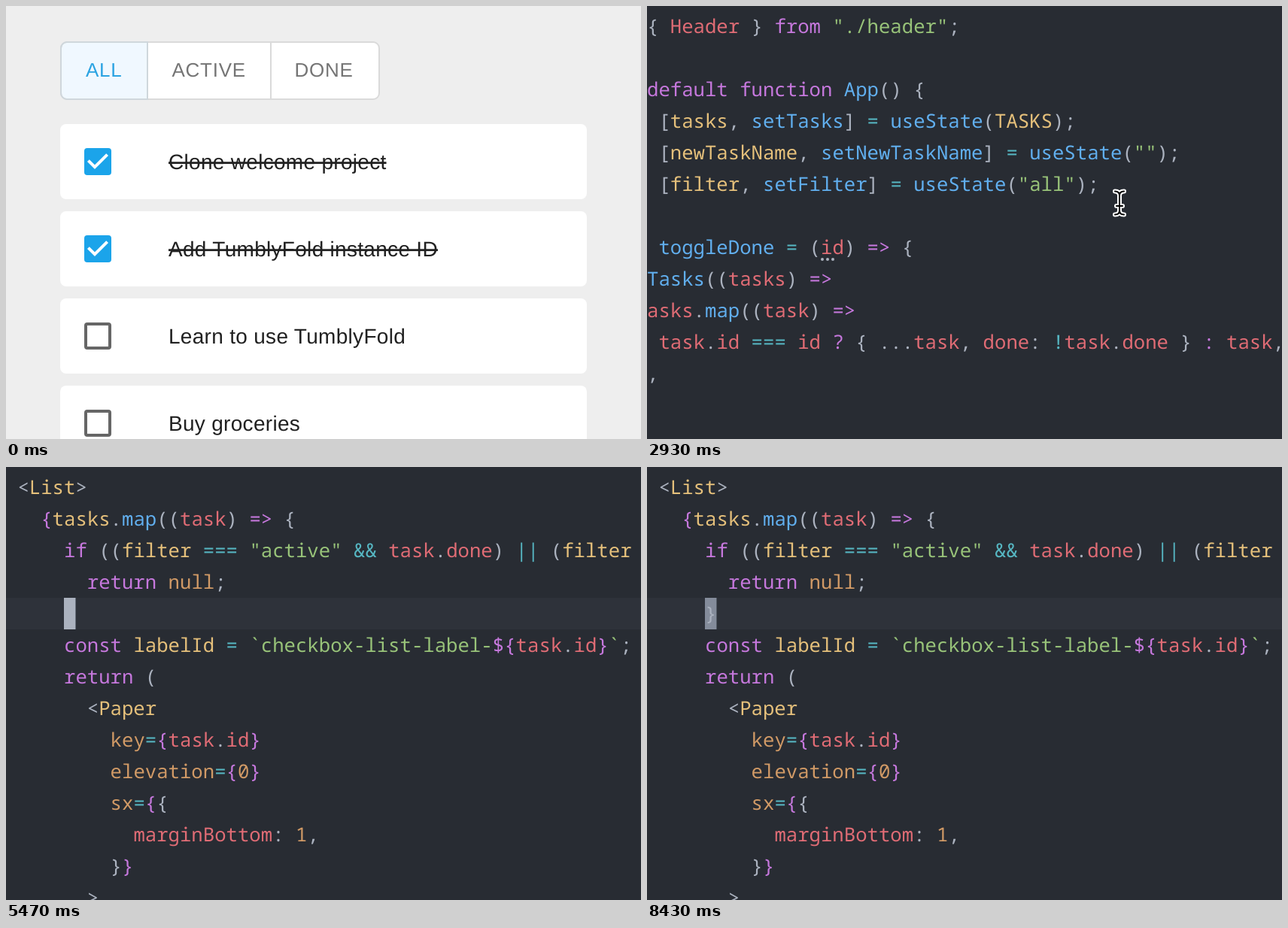
An HTML page for the animation above (8.47 s loop, 844 px wide and 576 px high).

```html
<!DOCTYPE html>
<html lang="en">
<head>
<meta charset="utf-8">
<title>Open in editor</title>
<style>
  html, body { margin: 0; width: 100%; height: 100%; overflow: hidden; background: #eee; }
  svg { display: block; width: 844px; height: 576px; }
  text { white-space: pre; text-rendering: geometricPrecision; }
  .tab { font: 26px "Liberation Sans", Arial, sans-serif; letter-spacing: .02857em; fill: #757575; }
  .tab.on { fill: #2ba3e2; }
  .task { font: 28px "Liberation Sans", Arial, sans-serif; letter-spacing: .01071em; fill: #212121; }
  .done { text-decoration: line-through; }
  .item { font: 500 22px Inter, sans-serif; fill: #333; }
  .code { font: 500 25.667px "Noto Sans Mono", monospace; }
  .outline { fill: none; stroke: #3580de; }
  #menu { filter: drop-shadow(0 8px 10px rgba(0, 0, 0, .16)); }
  #pointer { filter: drop-shadow(0 2px 2px rgba(0, 0, 0, .3)); }
</style>
</head>
<body>
<svg id="stage" viewBox="0 0 844 576">
  <g id="page">
    <rect width="844" height="576" fill="#eee"/>
    <rect x="73" y="48" width="423" height="76" rx="8" fill="#fff"/>
    <path d="M188 48H81a8 8 0 0 0-8 8v60a8 8 0 0 0 8 8H188z" fill="#f0f8ff"/>
    <rect x="73" y="48" width="423" height="76" rx="8" fill="none" stroke="#dadada" stroke-width="2"/>
    <path d="M352 48v76" stroke="#dadada" stroke-width="2"/>
    <path d="M188 48H81a8 8 0 0 0-8 8v60a8 8 0 0 0 8 8H188z" fill="none" stroke="#cfd7dc" stroke-width="2"/>
    <text class="tab on" x="106" y="94">ALL</text>
    <text class="tab" x="220.5" y="94">ACTIVE</text>
    <text class="tab" x="383.5" y="94">DONE</text>
    <g id="tasks"></g>
    <g id="cardLines"></g>
    <g id="textLines"></g>
    <g id="menu">
      <rect x="601" y="181" width="210" height="216" rx="5" fill="#eee" stroke="#c9c9c9" stroke-width="2"/>
      <rect id="hover" x="602" width="208" height="42" fill="#d0d0d0"/>
      <path d="M602 269H810" stroke="#cbcbcb" stroke-width="2"/>
      <text class="item" x="618" y="211">View In Source</text>
      <text class="item" x="618" y="253">Open In Editor</text>
      <text class="item" x="618" y="299">Copy</text>
      <text class="item" x="618" y="341">Duplicate</text>
      <text class="item" x="618" y="383">Delete</text>
      <path d="M778 249L789 238M780 238H789V247" fill="none" stroke="#333" stroke-width="2"/>
    </g>
    <path id="pointer" d="M0 0V28.5L6.4 22.6 11 33.5 16 31.4 11.4 20.8H20.5Z" stroke="#fff" stroke-width="2.2"/>
  </g>
  <g id="editor">
    <rect width="844" height="576" fill="#282c33"/>
    <g id="top">
      <g fill="#abb2bf"><circle cx="233" cy="337" r="2"/><circle cx="240" cy="337" r="2"/><circle cx="247" cy="337" r="2"/></g>
    </g>
    <g id="list">
      <rect id="row" width="844" height="42" fill="#2e323a"/>
      <rect id="match" width="15.4" height="42" fill="#515a6b"/>
      <rect id="caret" height="42" fill="#abb2bf"/>
      <g id="head"></g>
      <g id="added"></g>
      <g id="tail"></g>
    </g>
    <g id="beam" fill="none" stroke-linecap="round">
      <path id="beamShape" d="M-6-15.5Q0-15.5 0-10V10Q0 15.5-6 15.5M6-15.5Q0-15.5 0-10M6 15.5Q0 15.5 0 10M-4 4H4" stroke="#fff" stroke-width="6"/>
      <use href="#beamShape"/>
    </g>
  </g>
</svg>
<script>
const LOOP = 8470, CELL = 15.4, LINE = 42;
const $ = id => document.getElementById(id);

function add(parent, tag, attrs, text) {
  const el = document.createElementNS("http://www.w3.org/2000/svg", tag);
  for (const k in attrs) el.setAttribute(k, attrs[k]);
  if (text) el.textContent = text;
  parent.appendChild(el);
  return el;
}

// ---- task page ----
["Clone welcome project", "Add TumblyFold instance ID", "Learn to use TumblyFold", "Buy groceries"].forEach((name, i) => {
  const y = 157 + i * 116, done = i < 2, g = $("tasks");
  add(g, "rect", { x: 72, y, width: 700, height: 100, rx: 8, fill: "#fff" });
  if (done) {
    add(g, "rect", { x: 104, y: y + 32, width: 36, height: 36, rx: 4, fill: "#1ba4ea" });
    add(g, "path", { d: `M109.4 ${y + 48.6}l8.6 8.6 16.6-16.6`, fill: "none", stroke: "#fff", "stroke-width": 4 });
  } else {
    add(g, "rect", { x: 106, y: y + 34, width: 32, height: 32, rx: 2, fill: "none", stroke: "#666", "stroke-width": 4 });
  }
  add(g, "text", { class: done ? "task done" : "task", x: 216, y: y + 60 }, name);

  const w = i ? 2 : 4;
  const outline = (g, x, y, width, height) => add(g, "rect", {
    class: "outline", x: x + w / 2, y: y + w / 2, width: width - w, height: height - w, "stroke-width": w
  });
  outline($("cardLines"), 72, y, 700, 100);
  outline($("textLines"), 216, y + 30, 524, 40);
});

// ---- code: tokens split by "~", first letter is the colour, capitals are italic ----
const COLORS = { w: "#abb2bf", y: "#e5c07b", b: "#61afef", r: "#e06c75", p: "#c678dd", c: "#56b6c2", g: "#98c379", o: "#d19a66" };

function write(id, firstRow, lines) {
  lines.forEach(([col, src], i) => {
    let x = (col - 7) * CELL;
    for (const token of src.split("~")) {
      const key = token[0], body = token.slice(1), hue = key.toLowerCase();
      if (body.trim()) add($(id), "text", {
        class: "code", x, y: 36 + (firstRow + i) * LINE, fill: COLORS[hue],
        "font-style": key === hue ? "normal" : "italic"
      }, body);
      x += body.length * CELL;
    }
  });
}

write("top", 0, [
  [7, 'w{ ~rHeader~w } ~Pfrom~w ~g"./header"~w;'],
  [7, "w "],
  [7, "Pdefault~w ~pfunction~w ~bApp~w() {"],
  [8, "w[~ytasks~w, ~bsetTasks~w] ~c=~w ~buseState~w(~yTASKS~w);"],
  [8, 'w[~ynewTaskName~w, ~bsetNewTaskName~w] ~c=~w ~buseState~w(~g""~w);'],
  [8, 'w[~yfilter~w, ~bsetFilter~w] ~c=~w ~buseState~w(~g"all"~w);'],
  [7, "w "],
  [8, "btoggleDone~w ~c=~w (~rid~w) ~p=>~w {"],
  [7, "bTasks~w((~rtasks~w) ~p=>"],
  [7, "rasks~w.~bmap~w((~rtask~w) ~p=>"],
  [8, "rtask~w.~rid~w ~c===~w ~rid~w ~p?~w { ...~rtask~w, ~rdone~w: ~c!~rtask~w.~rdone~w } ~p:~w ~rtask~w,"],
  [7, "w,"]
]);
write("head", 0, [
  [8, "w<~yList~w>"],
  [10, "p{~ytasks~w.~bmap~w((~rtask~w) ~p=>~w {"]
]);
write("added", 2, [
  [12, 'Pif~w ((~yfilter~w ~c===~w ~g"active"~w ~c&&~w ~rtask~w.~rdone~w) ~c||~w (~yfilter'],
  [14, "Preturn~w ~onull~w;"],
  [12, "w}"]
]);
write("tail", 2, [
  [12, "pconst~w ~ylabelId~w ~c=~w ~g`checkbox-list-label-~p${~rtask~w.~rid~p}~g`~w;"],
  [12, "Preturn~w ("],
  [14, "w<~yPaper"],
  [16, "Okey~c=~p{~rtask~w.~rid~p}"],
  [16, "Oelevation~c=~p{~o0~p}"],
  [16, "Osx~c=~p{~w{"],
  [18, "rmarginBottom~w: ~o1~w,"],
  [16, "w}~p}"],
  [14, "w>"],
  [16, "w<~yListItem~w ~OdisablePadding~w>"],
  [18, "w<~yListItemButton"],
  [20, "OonClick~c=~p{~w() ~p=>~w ~btoggleDone~w(~rtask~w.~rid~w)~p}"]
]);

// ---- motion ----
const ENTER = [[170, 803, 91], [300, 722, 165], [420, 632, 200], [510, 593, 184], [570, 590, 177]];
const PICK = [[1570, 590, 177], [1700, 602, 196], [1850, 614, 226], [2070, 626, 258]];
const ROAM = [[3400, 628, 262], [3560, 786, 200], [3740, 430, 38], [3920, 68, 250], [4080, 250, 500],
  [4230, 587, 556], [4380, 120, 100], [4440, 61, 46], [4500, 64, 69]];
// caret fades, alternately out and in
const FADES = [3400, 3730, 4070, 4400, 4860, 5000, 5770, 6100, 6370, 6670, 7030, 7330, 7700, 8000, 8370];
// time, row, column of the caret
const CARET = [[2970, 4, 14], [4400, 1, 11], [4770, 1, 31], [5000, 2, 12], [5400, 4, 12]];

const smooth = p => p * p * (3 - 2 * p);
const show = (id, on) => { $(id).style.display = on ? "" : "none"; };
const move = (id, x, y) => $(id).setAttribute("transform", `translate(${x} ${y})`);

// smooth curve through timed points, at rest at both ends
function follow(keys, t) {
  const last = keys.length - 1;
  if (t <= keys[0][0]) return keys[0].slice(1);
  if (t >= keys[last][0]) return keys[last].slice(1);
  const i = keys.findIndex(k => k[0] > t) - 1;
  const a = keys[i], b = keys[i + 1], span = b[0] - a[0], u = (t - a[0]) / span;
  const slope = (j, d) => j === 0 || j === last ? 0 : (keys[j + 1][d] - keys[j - 1][d]) / (keys[j + 1][0] - keys[j - 1][0]);
  return [1, 2].map(d => a[d] + (b[d] - a[d]) * smooth(u)
    + span * u * (1 - u) * (slope(i, d) * (1 - u) - slope(i + 1, d) * u));
}

function caretAlpha(t) {
  const n = FADES.filter(f => f <= t).length;
  if (!n) return 1;
  const p = smooth(Math.min(1, (t - FADES[n - 1]) / 133));
  return n % 2 ? 1 - p : p;
}

function drawPage(t) {
  const [x, y] = follow(t < 1200 ? ENTER : PICK, t);
  const overText = t >= 370 && t < 620;
  show("pointer", t >= 170);
  move("pointer", x, y);
  show("textLines", overText);
  show("cardLines", t >= 270 && !overText);
  show("menu", t >= 1200);
  show("hover", x > 602);
  $("hover").setAttribute("y", y < 224 ? 182 : 224);
}

function drawEditor(t) {
  const inList = t >= 2970, opened = t >= 5000, pasted = t >= 5400;
  show("top", !inList);
  show("list", inList);
  show("added", pasted);
  move("tail", 0, pasted ? 3 * LINE : opened ? LINE : 0);

  const [, row, col] = CARET.filter(c => c[0] <= t).pop() || CARET[0];
  const x = (col - 7) * CELL, y = 6 + row * LINE;
  move("row", 0, y);
  move("match", x, y);
  move("caret", x, y);
  show("match", pasted || (t >= 4770 && !opened));
  $("caret").setAttribute("width", opened && !pasted ? 4 : CELL);
  $("caret").setAttribute("opacity", caretAlpha(t));

  show("beam", t < 4770);
  move("beam", ...follow(ROAM, t));
}

$("beam").lastElementChild.remove();
add($("beam"), "path", { d: $("beamShape").getAttribute("d"), stroke: "#000", "stroke-width": 2 });

let start;
function frame(now) {
  start ??= now;
  const t = (now - start) % LOOP, coding = t >= 2830;
  show("page", !coding);
  show("editor", coding);
  if (coding) drawEditor(t); else drawPage(t);
  requestAnimationFrame(frame);
}
requestAnimationFrame(frame);
</script>
</body>
</html>
```
